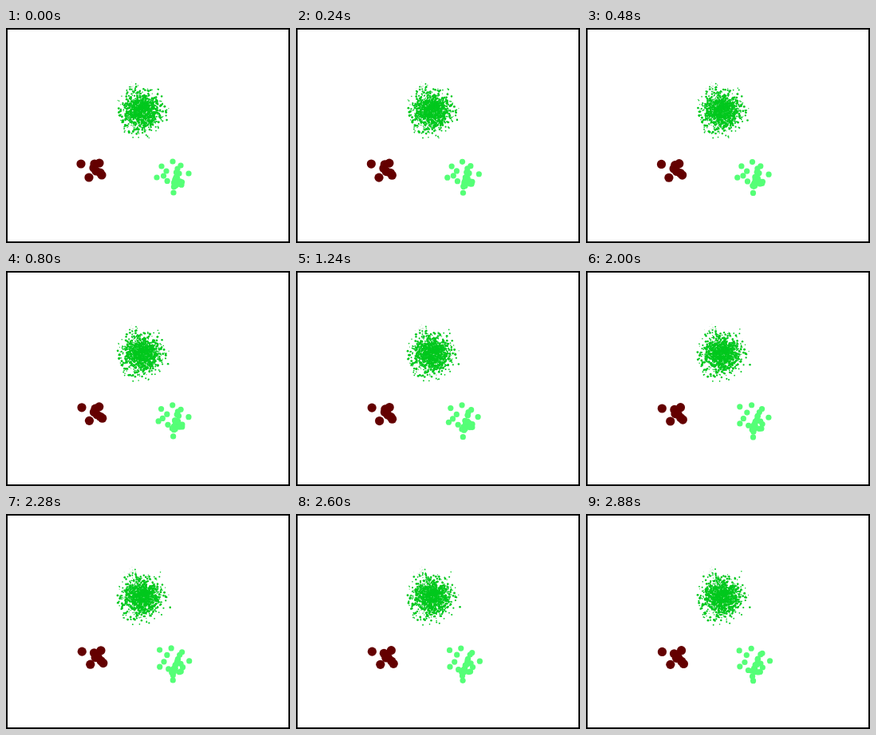
An HTML page with a canvas that plays this animation: 356 px wide and 269 px high, repeating every 2920 ms.

```html
<!DOCTYPE html>
<html>
<head>
<meta charset="utf-8">
<style>
html, body { margin: 0; width: 100%; height: 100%; overflow: hidden; background: #fff; }
canvas { display: block; }
</style>
</head>
<body>
<canvas id="stage" width="356" height="269"></canvas>
<script>
const ctx = document.getElementById('stage').getContext('2d');
const STEP = 40, STEPS = 73, TAU = Math.PI * 2;

let seed = 7;
function rand() {
  seed = (seed * 16807) % 2147483647;
  return seed / 2147483647;
}
const gauss = () => Math.sqrt(-2 * Math.log(rand())) * Math.cos(TAU * rand());

// Smooth random walk from 0: a steady drift plus sines of falling size
function makeWalk(drift, size) {
  const end = drift + gauss() * size;
  const waves = [1, 2, 3, 5, 9, 15].map(n => ({ n, a: gauss() * size * 0.4 / n }));
  return k => waves.reduce((sum, { n, a }) => sum + a * Math.sin(Math.PI * n * k), end * k);
}

// Normally distributed points, kept within three spreads of the centre
function scatter(count, cx, cy, spread) {
  const points = [];
  while (points.length < count) {
    const x = gauss(), y = gauss();
    if (Math.hypot(x, y) < 3) points.push([cx + x * spread, cy + y * spread]);
  }
  return points;
}

function makeGroup(points, { color, minR, maxR = minR, drift = [0, 0], size }) {
  const dots = points.map(([x, y]) => ({
    x, y,
    r: minR + (maxR - minR) * rand(),
    walkX: makeWalk(drift[0], size),
    walkY: makeWalk(drift[1], size)
  }));
  return k => {
    ctx.fillStyle = color;
    for (const d of dots) {
      ctx.beginPath();
      ctx.arc(d.x + d.walkX(k), d.y + d.walkY(k), d.r, 0, TAU);
      ctx.fill();
    }
  };
}

const redStart = [[94, 170], [111, 170], [110, 175], [117, 169],
                  [113, 179], [118, 181], [120, 184], [104, 187]];
const mintRim = [[209, 167], [195, 173], [219, 172], [215, 176], [201, 179],
                 [217, 182], [229, 182], [189, 187], [210, 206]];

const groups = [
  makeGroup(scatter(16, 157, 76, 4), { color: '#c4e6c8', minR: 0.5, drift: [0, -2], size: 1.5 }),
  makeGroup(scatter(1150, 170, 104, 11.6), { color: '#00c81e', minR: 0.5, maxR: 1.5, size: 1.6 }),
  makeGroup(redStart, { color: '#640000', minR: 5.6, drift: [2, 2.5], size: 1.2 }),
  makeGroup([...mintRim, ...scatter(17, 211, 193, 5.5)],
    { color: '#55ff77', minR: 3.6, drift: [0, 0.5], size: 2 })
];

function draw(step) {
  ctx.fillStyle = '#fff';
  ctx.fillRect(0, 0, 356, 269);
  for (const drawGroup of groups) drawGroup(step / (STEPS - 1));
  ctx.lineWidth = 2;
  ctx.strokeRect(1, 1, 354, 267);
}

const start = performance.now();
let shown = -1;
function tick() {
  const step = Math.floor((performance.now() - start) / STEP) % STEPS;
  if (step !== shown) draw(shown = step);
  requestAnimationFrame(tick);
}
tick();
</script>
</body>
</html>
```
